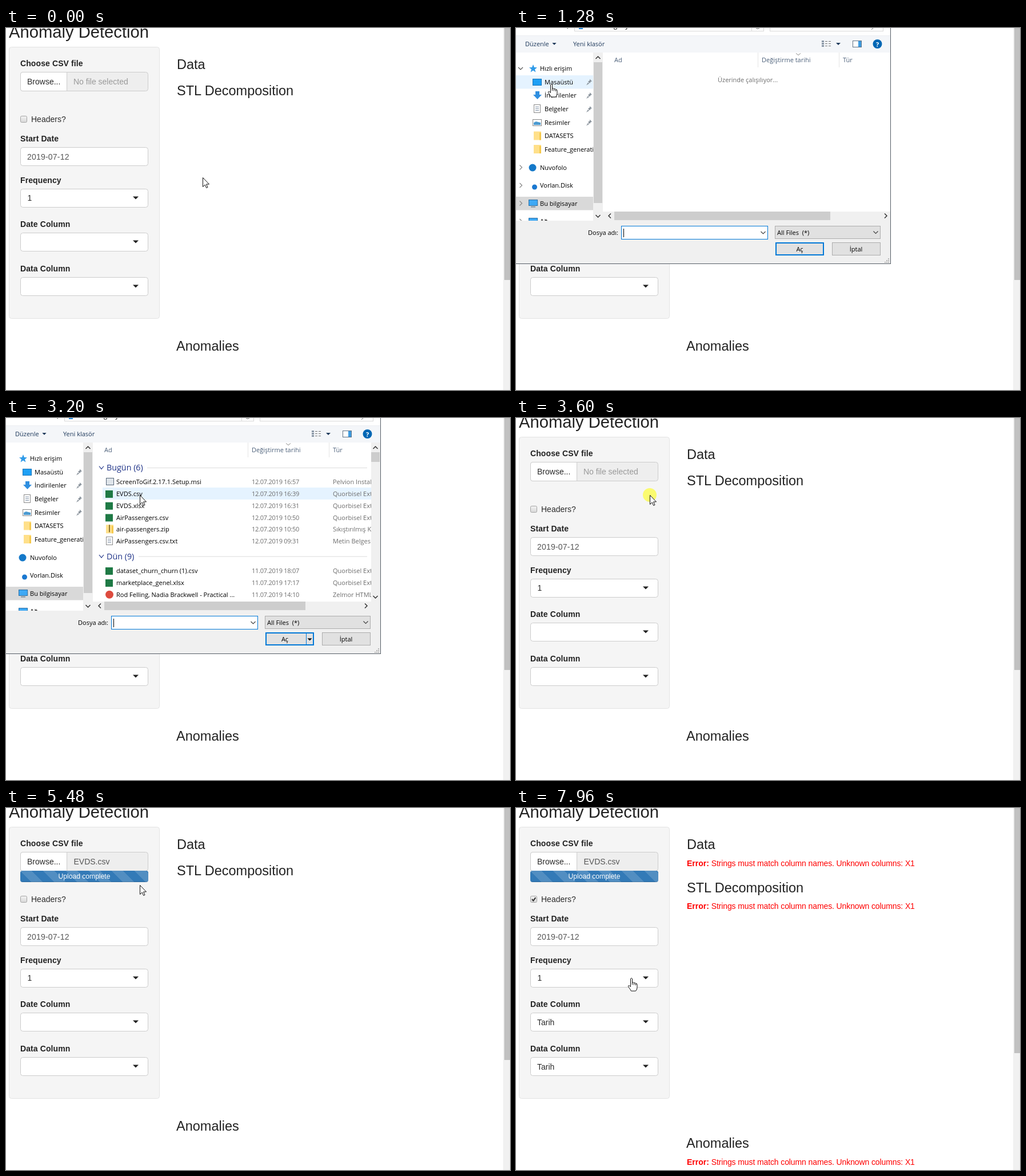
Write an HTML page that moves like this. It is 882x635 px and loops after 8 s.

```html
<!DOCTYPE html>
<html lang="en">
<head>
<meta charset="utf-8">
<title>Anomaly Detection</title>
<style>
html, body { margin: 0; width: 100%; height: 100%; overflow: hidden; background: #fff; }
svg { display: block; width: 100vw; height: 100vh; }
text { font: 14px "Liberation Sans", Arial, sans-serif; fill: #2b2b2b; white-space: pre; }
.b { font-weight: 700; letter-spacing: .1px; fill: #222; }
.h { font-size: 23.5px; fill: #222; }
.title { font-size: 29.2px; fill: #222; }
.n { letter-spacing: .2px; }
.in { fill: #555; }
.off { fill: #999; }
.err, .err tspan { fill: #f00; }
.err tspan:first-child { font-weight: 700; }
.tight { letter-spacing: -.11px; }
.up { font-size: 12.1px; fill: #fff; text-anchor: middle; }
.w { font: 11px "Open Sans", "Noto Sans", sans-serif; fill: #000; }
.tool { fill: #1e395b; }
.col { fill: #4c607a; }
.dim { fill: #6d6d6d; }
.date { letter-spacing: -.25px; }
.grp { font-size: 14.3px; fill: #1e3287; }
.mid { text-anchor: middle; }
.help { font-weight: 700; fill: #fff; text-anchor: middle; }
</style>
</head>
<body>
<svg id="stage" viewBox="0 0 882 635" preserveAspectRatio="none"></svg>
<script>
const T = (x, y, s, c = '', extra = '') => `<text x="${x}" y="${y}" class="${c}" ${extra}>${s}</text>`;
const R = (x, y, w, h, fill, extra = '') => `<rect x="${x}" y="${y}" width="${w}" height="${h}" fill="${fill}" ${extra}/>`;
const box = (x, y, w, h, fill, line, r = 0) => R(x + .5, y + .5, w - 1, h - 1, fill, `stroke="${line}" rx="${r}"`);
const P = (d, fill, extra = '') => `<path d="${d}" fill="${fill}" ${extra}/>`;
const line = (d, color, w = 1) => P(d, 'none', `stroke="${color}" stroke-width="${w}"`);
const dot = (x, y, r, fill) => `<circle cx="${x}" cy="${y}" r="${r}" fill="${fill}"/>`;
const G = (id, body, extra = '') => `<g id="${id}" ${extra}>${body}</g>`;
const clipped = (id, body) => `<g clip-path="url(#${id})">${body}</g>`;
const clip = (id, x, y, w, h) => `<clipPath id="${id}">${R(x, y, w, h, '#000')}</clipPath>`;
const error = (y, msg, c = '') => `<text x="299" y="${y}" class="err"><tspan>Error:</tspan><tspan class="${c}"> ${msg}</tspan></text>`;
const chev = (x, y, dx, dy, color = '#555', w = 1.2) => dx
  ? line(`M${x - dx} ${y - 4}l${2 * dx} 4l${-2 * dx} 4`, color, w)
  : line(`M${x - 4} ${y - dy}l4 ${2 * dy}l4 ${-2 * dy}`, color, w);
const tri = (x, y, r, fill) => P(`M${x - r} ${y}h${2 * r}l${-r} ${r}z`, fill);

// ---- web page ----
function page() {
  const field = y => box(25, y, 224, 33, '#fff', '#ccc', 4);
  const select = y => field(y) + tri(227, y + 13.5, 5, '#222');
  const labels = [['Choose CSV file', 67], ['Start Date', 199], ['Frequency', 272], ['Date Column', 349], ['Data Column', 427]];
  const bar = R(25, 110, 224, 20, '#337ab7') + R(25, 110, 224, 20, 'url(#stripes)') + R(25, 129, 224, 1, 'rgba(0,0,0,.15)')
    + T(137, 124, 'Upload complete', 'up', 'id="done"');
  return T(5, 16.5, 'Anomaly Detection', 'title')
    + box(5, 33, 264, 477, '#f5f5f5', '#e3e3e3', 4)
    + labels.map(([s, y]) => T(25, y, s, 'b')).join('')
    + box(25, 77, 224, 34, '#eee', '#ccc', 4)
    + P('M29 77.5H106.5V110.5H29a3.5 3.5 0 0 1-3.5-3.5V81a3.5 3.5 0 0 1 3.5-3.5z', '#fff', 'id="browse" stroke="#ccc"')
    + T(37, 98.5, 'Browse...')
    + G('nofile', T(118, 98.5, 'No file selected', 'off'))
    + G('file', T(118.5, 98.5, 'EVDS.csv', 'in') + R(25, 110, 224, 20, '#f0f0f0', 'rx="4"') + clipped('barClip', bar))
    + box(25, 154, 12, 12, 'url(#chk)', '#a3a3a3', 2)
    + G('tick', line('M28 160l2.3 2.6l4-5.4', '#333', 2))
    + T(44, 164.5, 'Headers?')
    + field(209) + T(37, 231, '2019-07-12', 'in n')
    + select(282) + T(37.5, 303, '1')
    + select(359) + select(437)
    + G('x1', T(37, 380.5, 'X1') + T(37, 458.5, 'X1'))
    + G('tarih', T(37, 380.5, 'Tarih') + T(37, 458.5, 'Tarih'))
    + T(299, 72, 'Data', 'h')
    + G('stl', T(299, 0, 'STL Decomposition', 'h'))
    + G('anom', T(298, 0, 'Anomalies', 'h'))
    + G('table', table())
    + G('errors', [102, 177, 626].map(y => error(y, 'Strings must match column names. Unknown columns: X1', 'tight')).join(''))
    + R(870, 0, 12, 635, '#f1f1f1') + R(872, 0, 10, 442, '#c1c1c1', 'id="thumb"');
}

function table() {
  const rows = ['Tarih', '2005-01', '2005-02', '2005-03', '2005-04', '2005-05'];
  return T(310.5, 107, 'date', 'b') + T(387, 107, 'data', 'b') + R(299, 117.5, 151, 1.6, '#ddd')
    + rows.map((s, i) => {
      const y = 139 + i * 30.6;
      return T(310.3, y, s, 'n') + T(386.6, y, s, 'n') + (i ? R(299, Math.round(y - 20.5), 151, 1, '#ddd') : '');
    }).join('')
    + error(371, 'series is not periodic or has less than two periods');
}

// ---- file dialog ----
const sheet = (x, y) => box(x, y, 12, 15, '#fff', '#8a8a8a') + [4, 7, 10].map(d => R(x + 3, y + d, 6, 1, '#7d8fa5')).join('');
const folder = (x, y) => R(x, y, 13, 15, '#ffe08a') + R(x + 10, y + 2, 3, 13, '#f5c94e');
const screen = (x, y) => box(x, y, 16, 11, '#3fa9f5', '#2b6ea3') + R(x + 4, y + 12, 8, 1.5, '#6f8496');
const pin = y => P(`M129 ${y - 5}l4 4l-2 .6l-2 3l-3-3l3-2zM126 ${y + 1}l2 2l-5 3z`, '#8a939c');

function sidebar() {
  const kids = [['Masaüstü', 94.5], ['İndirilenler', 118], ['Belgeler', 142], ['Resimler', 165.5], ['DATASETS', 189], ['Feature_generation', 212.5]];
  const tops = [['Hızlı erişim', 71], ['Nuvofolo', 244.5], ['Vorlan.Disk', 276], ['Bu bilgisayar', 307.5], ['Ağ', 339]];
  return R(0, 43, 136, 295, '#fff') + R(0, 83, 135, 23.5, '#e5f3ff', 'id="hoverSide"') + R(0, 296, 135, 23.5, '#d9d9d9')
    + kids.map(([s, y], i) => T(50, y + 4, s, 'w') + (i < 4 ? pin(y) : '')).join('')
    + tops.map(([s, y]) => T(42, y + 4, s, 'w')).join('')
    + G('chevs', chev(8, 71, 0, 2) + tops.slice(1).map(([, y]) => chev(8.5, y, 2, 0, '#888')).join(''))
    + P('M30 64l2 5l5 .3l-4 3.3l1.5 5l-4.5-3l-4.5 3l1.5-5l-4-3.3l5-.3z', '#2f9ae8')
    + box(29, 89, 16, 12, '#1ea0f5', '#1673b8')
    + P('M34 111h7v6h4l-7.5 8l-7.5-8h4z', '#2f8fe0')
    + sheet(31, 134) + box(29, 160, 16, 12, '#fff', '#8a8a8a') + P('M31 170v-4l4-2l8 2v4z', '#4b9ad0')
    + folder(31, 181.5) + folder(31, 205)
    + dot(29, 245, 6.5, '#1579c9') + dot(32.5, 279, 4.5, '#1a78d0') + screen(22, 301) + screen(22, 333);
}

function files() {
  const ex = 'Quorbisel Exter', d = '12.07.2019 ', e = '11.07.2019 ';
  const sq = (x, y) => R(x, y - 6, 13, 13, '#1f7a45');
  const list = [
    [112, 'ScreenToGif.2.17.1.Setup.msi', d + '16:57', 'Pelvion Installer', (x, y) => box(x + 1, y - 7, 14, 13, '#dfe5ea', '#56677a')],
    [133, 'EVDS.csv', d + '16:39', ex, sq],
    [153.8, 'EVDS.xlsx', d + '16:31', ex, sq],
    [174.5, 'AirPassengers.csv', d + '10:50', ex, sq],
    [195.3, 'air-passengers.zip', d + '10:50', 'Sıkıştırılmış Klasör', (x, y) => folder(x + 1, y - 8) + R(x + 6, y - 8, 2, 13, '#8a7434')],
    [216, 'AirPassengers.csv.txt', d + '09:31', 'Metin Belgesi', (x, y) => sheet(x + 1, y - 8)],
    [268, 'dataset_churn_churn (1).csv', e + '18:07', ex, sq],
    [289, 'marketplace_genel.xlsx', e + '17:17', ex, sq],
    [309.8, 'Rod Felling, Nadia Brackwell - Practical ...', e + '14:10', 'Zelmor HTML', (x, y) => dot(x + 7, y, 7, '#dd4b3e')]];
  const head = (y, s, x) => chev(167, y, 0, 2.5, '#1e3287') + T(176, y + 5, s, 'w grp') + R(x, y, 632 - x, 1, '#dcdcdc');
  return R(169, 102, 470, 21, '#e5f3ff', 'id="hover1"') + R(169, 122, 470, 21, '#e5f3ff', 'id="hover2"')
    + G('picked', box(169, 122, 470, 21, '#cce8ff', '#99d1ff'))
    + head(87, 'Bugün (6)', 247) + head(242.5, 'Dün (9)', 232)
    + list.map(([y, name, date, type, icon]) => icon(174, y) + T(193, y + 4, name, 'w')
      + T(430, y + 4, date, 'w dim date') + T(572, y + 4, type, 'w dim')).join('');
}

function dialog() {
  const thumb = '#cdcdcd', blue = '#0078d7';
  const across = (w, x) => R(172, 322, w, 15, thumb) + chev(164, 329.5, -2, 0, '#333', 1.5) + chev(x, 329.5, 2, 0, '#333', 1.5);
  const upDown = (x, y1, y2) => chev(x, y1, 0, -2, '#333', 1.5) + chev(x, y2, 0, 2, '#333', 1.5);
  return box(-2, -2, 658, 416, '#f0f0f0', '#555d66')
    + R(0, 0, 655, 13, '#fff') + box(102, -9, 332, 15, '#fff', '#d9d9d9') + box(444, -9, 199, 15, '#fff', '#d9d9d9')
    + R(412, 0, 1, 6, '#d9d9d9') + R(110, 0, 7, 2, '#2f8fe0') + T(142, -.5, 'Bu bilgisayar', 'w') + line('M88 -1l3 2', '#555')
    + line('M420 0q3 3 6 0M625 0l-3 3', '#777')
    + R(0, 13, 655, 30, '#f4f6f9') + R(0, 13, 655, 1, '#eceef1')
    + T(16, 32, 'Düzenle', 'w tool') + tri(67, 26, 3.7, '#1e395b') + T(100, 32, 'Yeni klasör', 'w tool')
    + [22, 26, 30].map(y => R(535, y, 4, 3, '#8a97a6') + R(541, y + 1, 4, 1, '#777') + R(547, y + 1, 4, 1, '#777')).join('')
    + tri(564, 26, 4, '#1e395b') + box(589, 22, 16, 12, '#fff', '#5f7284') + R(599, 23, 5, 10, '#3d9be0')
    + dot(632.5, 28, 8, '#0066b4') + T(632.5, 32.5, '?', 'w help')
    + clipped('side', sidebar())
    + R(136, 43, 15, 295, '#f0f0f0') + R(136, 60, 15, 247, thumb) + upDown(143.5, 52, 330)
    + R(152, 43, 503, 295, '#fff') + R(152, 322, 503, 16, '#f0f0f0')
    + T(172, 60, 'Ad', 'w col') + T(430, 60, 'Değiştirme tarihi', 'w col') + T(572, 60, 'Tür', 'w col')
    + R(423, 43, 1, 26, '#e5e5e5') + R(565, 43, 1, 26, '#e5e5e5') + chev(494, 46, 0, 1.7, '#8a8a8a', 1)
    + G('busy', T(353, 94.5, 'Üzerinde çalışılıyor...', 'w dim') + across(378, 647) + T(496.5, 392, '', 'w mid'))
    + G('files', clipped('list', files()) + R(639, 43, 16, 295, '#f0f0f0')
      + R(639, 60, 15, 17, thumb) + upDown(646.5, 52, 314) + across(352, 630))
    + T(126, 363, 'Dosya adı:', 'w') + box(184, 347, 257, 24, '#fff', blue) + chev(432.5, 359, 0, 2, '#444')
    + R(188, 352, 1, 15, '#000', 'id="caret"') + G('name', T(188, 363, 'EVDS.csv', 'w'))
    + box(453, 347, 185, 23, '#e1e1e1', '#adadad') + T(457, 363, 'All Files  (*)', 'w') + chev(629.5, 358.5, 0, 2, '#444')
    + R(455, 377, 83, 21, '#e1e1e1', `stroke="${blue}" stroke-width="2"`)
    + G('open1', T(496.5, 392, 'Aç', 'w mid'))
    + G('open2', T(488, 392, 'Aç', 'w mid') + R(525, 378, 1, 19, blue) + tri(531.5, 386.5, 4, '#000'))
    + box(553, 376, 85, 23, '#e1e1e1', '#adadad') + T(595, 392, 'İptal', 'w mid')
    + [0, 1, 2].map(i => [0, 1, 2].map(j => i + j > 1 ? R(645 + i * 3, 404 + j * 3, 2, 2, '#b5b5b5') : '').join('')).join('');
}

// ---- pointer, hotspot at 0,0 ----
const edge = 'stroke="#111" stroke-linejoin="round"';
const pointer = G('glow', dot(0, 0, 12, 'rgba(255,255,0,.55)'))
  + G('arrow', P('M.5 .5V16.5L4.2 13L6.7 18.5L9 17.5L6.6 12H11.5z', '#fff', edge))
  + G('hand', P('M-1.5 1.5Q0 -1 1.5 1.5V8.5Q3.5 6.5 4.5 9Q6.7 7.5 7.5 10Q10 9.2 10 12V17Q10 20 7.5 23H-.5Q-1.5 20.5 -5.5 15.5Q-6 12 -2.5 14.5L-1.5 15.5z', '#fff', edge)
    + line('M1.5 8.5V12M4.5 9V12.5M7.5 10V13', '#111'));

document.getElementById('stage').innerHTML = `<defs>
  <linearGradient id="stripes" gradientUnits="userSpaceOnUse" x1="25" y1="110" x2="45" y2="90" spreadMethod="repeat">
    <stop stop-color="#fff" stop-opacity=".15"/><stop offset=".5" stop-color="#fff" stop-opacity=".15"/>
    <stop offset=".5" stop-color="#fff" stop-opacity="0"/><stop offset="1" stop-color="#fff" stop-opacity="0"/></linearGradient>
  <linearGradient id="chk" x2="0" y2="1"><stop stop-color="#f2f2f2"/><stop offset="1" stop-color="#d8d8d8"/></linearGradient>
  <clipPath id="barClip"><rect id="barBox" x="25" y="110" width="224" height="20" rx="4"/></clipPath>
  ${clip('side', 0, 43, 135, 295)}${clip('list', 152, 43, 487, 279)}</defs>`
  + page() + G('dialog', dialog()) + G('pointer', pointer);

// ---- timeline ----
const LOOP = 8000;
const shown = {
  nofile: [[0, 3760]], file: [[3760, LOOP]], tick: [[6480, LOOP]],
  x1: [[5560, 7400]], tarih: [[7400, LOOP]],
  table: [[5920, 7400]], errors: [[5560, 5920], [7400, LOOP]],
  dialog: [[1200, 3560]], busy: [[1200, 1520]], open1: [[1200, 1520]],
  files: [[1520, 3560]], open2: [[1520, 3560]],
  hoverSide: [[1200, 1760]], hover1: [[2440, 2600]], hover2: [[2600, 3360]],
  picked: [[3360, 3560]], name: [[3360, 3560]],
  caret: [[1200, 1600], [2120, 2640], [3200, 3360]],
  glow: [[1040, 1200], [3360, 3680], [6400, 6560]],
  hand: [[640, 1360], [6080, 7360], [7920, LOOP]],
  arrow: [[0, 640], [1360, 6080], [7360, 7920]]
};
const path = [[40, 344, 262], [720, 62, 98], [1560, 62, 98], [2240, 176, 101], [2400, 176, 101], [2840, 234, 135],
  [5480, 234, 135], [5760, 81, 150], [6040, 81, 150], [6160, 81, 154], [7160, 81, 154], [7880, 187, 265], [7960, 202, 298]];
const chevFade = [[1560, 1], [2280, .5], [2400, .5], [2560, 0]];
const tableFade = [[7080, 1], [7320, .3]];
const upload = [[3720, 0], [4360, 1]];

const el = id => document.getElementById(id);
const smooth = k => k * k * (3 - 2 * k);
function at(keys, t) {
  const i = keys.findIndex(k => k[0] > t);
  if (i < 0) return keys[keys.length - 1].slice(1);
  if (i === 0) return keys[0].slice(1);
  const a = keys[i - 1], b = keys[i], k = smooth((t - a[0]) / (b[0] - a[0]));
  return a.slice(1).map((v, j) => v + (b[j + 1] - v) * k);
}
const move = (id, x, y) => el(id).setAttribute('transform', `translate(${x} ${y})`);

function draw(now) {
  const t = Math.floor(now % LOOP / 40) * 40;
  for (const id in shown)
    el(id).style.display = shown[id].some(([a, b]) => t >= a && t < b) ? '' : 'none';

  const [x, y] = at(path, t).map(Math.round);
  move('pointer', x, y);
  const over = t < 1360 && x >= 25 && x < 107 && y >= 77 && y < 111;
  el('browse').setAttribute('fill', over ? '#e6e6e6' : '#fff');

  const w = 224 * at(upload, t)[0];
  el('barBox').setAttribute('width', w);
  el('done').setAttribute('x', 25 + w / 2);

  // page layout: empty, errors, table
  const mode = t < 5560 ? 0 : t >= 5920 && t < 7400 ? 2 : 1;
  move('stl', 0, [118, 147.5, 340.5][mode]);
  move('anom', 0, [566, 596, 789][mode]);
  el('thumb').setAttribute('height', [442, 430, 360][mode]);
  el('table').style.opacity = at(tableFade, t)[0];
  el('chevs').style.opacity = at(chevFade, t)[0];
}

const start = performance.now();
(function tick() {
  draw(performance.now() - start);
  requestAnimationFrame(tick);
})();
</script>
</body>
</html>
```
